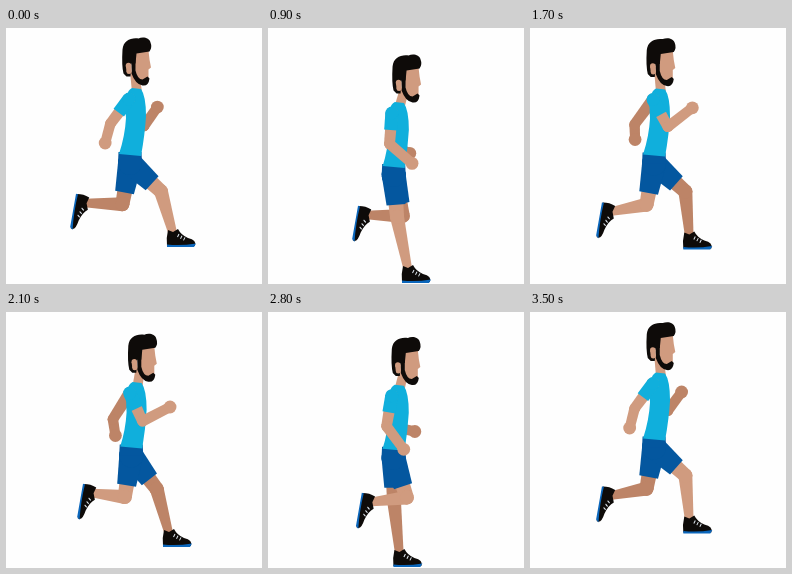
Recreate the animation shown at these times as an HTML page with a canvas. Size 256 by 256 pixels, loop 3.6 s.

```html
<!DOCTYPE html>
<html lang="en">
<head>
<meta charset="utf-8">
<title>Runner</title>
<style>
  html, body { margin: 0; width: 100%; height: 100%; overflow: hidden; background: #fefefe; }
  canvas { display: block; width: 100vw; height: 100vh; }
</style>
</head>
<body>
<canvas id="stage"></canvas>
<script>
const LOOP = 3600, STEP = 100, SIZE = 256, RAD = Math.PI / 180;
const SKIN = '#d09b7f', SHADE = '#bd8467', SHIRT = '#10afdc', SHORTS = '#04579f',
      BLACK = '#0e0b09', SOLE = '#0b66bb', LACE = '#e4ecf4';

// Ankle path of one stride, evenly spaced in time
const ANKLE = [
  [167, 206], [163, 222], [155, 236], [140, 242], [112, 237], [90, 209],
  [79, 175], [86, 181], [92, 186], [99, 187], [113, 199], [137, 216]
];

const HAIR = new Path2D('M1 36Q-1 28 0 12C1 3 8 0 16 1C20-1 27 0 28 5Q30 10 27 14L14 16L13 26L9 26L8 39L4 39Z');
const FACE = new Path2D('M12 13L26 13L27 22L28.5 30L26 32L26 42L13 44Z');
const BEARD = new Path2D('M9 20L13 16L13 33Q15 42 20 42L25 39L27 41Q26 49 20 48Q13 47 9 36Z');
const SHOE = new Path2D('M-5-4Q-7 4-6 12L22 12Q24 6 15 4Q8 1 5-5L0-2Z');
const SOLE_EDGE = new Path2D('M-6 10.5Q8 12 23 9.5L21 13L-6 13Z');

const canvas = document.getElementById('stage');
const ctx = canvas.getContext('2d');

// Closed Catmull-Rom curve; phase runs from 0 to 1
function along(points, phase) {
  const n = points.length, s = phase * n, i = Math.floor(s), u = s - i;
  const [a, b, c, d] = [n - 1, 0, 1, 2].map(k => points[(i + k) % n]);
  return [0, 1].map(k => b[k] + u / 2 * (c[k] - a[k] +
    u * (2 * a[k] - 5 * b[k] + 4 * c[k] - d[k] + u * (3 * (b[k] - c[k]) + d[k] - a[k]))));
}

function smooth(from, to, value) {
  const u = Math.min(1, Math.max(0, (value - from) / (to - from)));
  return u * u * (3 - 2 * u);
}

// Body drop, 0 to 1, twice per stride: falls quickly, rises slowly
function bob(phase) {
  const p = phase * 2 % 1 * Math.PI;
  return (1 - Math.cos(2 * p + 0.8 * Math.sin(p) + 0.4 * Math.sin(2 * p))) / 2;
}

// Point at a distance; the angle is measured forward from straight down
function reach([x, y], length, degrees) {
  return [x + length * Math.sin(degrees * RAD), y + length * Math.cos(degrees * RAD)];
}

function disc([x, y], r, color) {
  ctx.fillStyle = color;
  ctx.beginPath();
  ctx.arc(x, y, r, 0, 2 * Math.PI);
  ctx.fill();
}

// Tapered bar from one point to another, widths at both ends
function bar([x1, y1], [x2, y2], w1, w2, color) {
  const len = Math.hypot(x2 - x1, y2 - y1) || 1;
  const nx = (y1 - y2) / len / 2, ny = (x2 - x1) / len / 2;
  ctx.fillStyle = color;
  ctx.beginPath();
  ctx.moveTo(x1 + nx * w1, y1 + ny * w1);
  ctx.lineTo(x2 + nx * w2, y2 + ny * w2);
  ctx.lineTo(x2 - nx * w2, y2 - ny * w2);
  ctx.lineTo(x1 - nx * w1, y1 - ny * w1);
  ctx.fill();
}

function limb(a, b, w1, w2, color) {
  bar(a, b, w1, w2, color);
  disc(a, w1 / 2, color);
  disc(b, w2 / 2, color);
}

function shoe([x, y], degrees) {
  const down = Math.sin(degrees * RAD);
  ctx.save();
  ctx.translate(x, y);
  ctx.rotate(degrees * RAD);
  ctx.scale(1 + 0.25 * down, 1 - 0.2 * down);
  ctx.fillStyle = BLACK;
  ctx.fill(SHOE);
  ctx.fillStyle = SOLE;
  ctx.fill(SOLE_EDGE);
  for (let i = 0; i < 3; i++) bar([6 + i * 3, i * 1.7], [4.5 + i * 3, 3 + i * 1.7], 1, 1, LACE);
  ctx.restore();
}

function leg(phase, hip, color) {
  const a = phase * 2 * Math.PI;
  const swing = 13.5 + 29 * Math.cos(a) - 4 * Math.sin(a) + 5 * Math.cos(2 * a) - 2 * Math.sin(2 * a);
  const knee = reach(hip, 42, swing), ankle = along(ANKLE, phase);
  const trail = Math.atan2(knee[0] - ankle[0], ankle[1] - knee[1]) / RAD;
  limb(hip, knee, 17, 14, color);
  limb(knee, ankle, 14, 8.5, color);
  shoe(ankle, 100 * smooth(8, 42, trail));
  bar(hip, reach(hip, 30, swing), 24, 19, SHORTS);
  disc(hip, 12, SHORTS);
}

function arm(phase, shoulder, far) {
  const color = far ? SHADE : SKIN;
  const c = Math.cos(phase * 2 * Math.PI);
  const swing = -4 - 33 * c;
  const bend = 49 - 72 * c + 8 * c * c + (far ? 16 : 0);
  const length = (31 - 11 * ((1 + c) / 2) ** 3) * (far ? 0.75 : 1);
  const elbow = reach(shoulder, 31, swing), hand = reach(elbow, length, bend);
  limb(shoulder, elbow, 12, 10.5, color);
  limb(elbow, hand, 10.5, 10, color);
  disc(hand, 6.4, color);
  if (far) return;
  bar(shoulder, reach(shoulder, 17, swing), 13, 13, SHIRT);
  disc(shoulder, 6.5, SHIRT);
}

function torso([wx, wy], [nx, ny]) {
  ctx.fillStyle = SHIRT;
  ctx.beginPath();
  ctx.moveTo(wx - 11, wy + 1);
  ctx.quadraticCurveTo(nx - 12, ny + 48, nx - 11, ny + 30);
  ctx.quadraticCurveTo(nx - 13, ny + 3, nx - 5, ny);
  ctx.lineTo(nx + 4, ny + 1);
  ctx.quadraticCurveTo(nx + 9, ny + 8, nx + 9, ny + 28);
  ctx.quadraticCurveTo(nx + 8, ny + 46, wx + 11, wy + 3);
  ctx.fill();
}

function head([x, y]) {
  ctx.save();
  ctx.translate(x, y);
  for (const [path, color] of [[FACE, SKIN], [BEARD, BLACK], [HAIR, BLACK]]) {
    ctx.fillStyle = color;
    ctx.fill(path);
  }
  limb([6, 28], [6.5, 34], 5.5, 5, SKIN);
  ctx.restore();
}

function draw(phase) {
  const drop = bob(phase), opposite = (phase + 0.5) % 1;
  const waist = [124 + 2 * drop, 125 + 14 * drop];
  const neck = [131 + drop, 60 + 16.5 * drop];
  const skull = [116.5 + 9.5 * drop, 9.5 + 20 * drop];
  const hip = [waist[0], waist[1] + 10];
  const shoulder = [neck[0] - 8, neck[1] + 11];

  ctx.fillStyle = '#fefefe';
  ctx.fillRect(0, 0, SIZE, SIZE);
  arm(opposite, shoulder, true);
  leg(opposite, hip, SHADE);
  leg(phase, hip, SKIN);
  bar([waist[0], waist[1] - 1], hip, 23, 24, SHORTS);
  bar([skull[0] + 12, skull[1] + 34], [neck[0], neck[1] + 4], 9, 10, SKIN);
  torso(waist, neck);
  head(skull);
  arm(phase, shoulder, false);
}

function fit() {
  const ratio = window.devicePixelRatio || 1;
  canvas.width = innerWidth * ratio;
  canvas.height = innerHeight * ratio;
  ctx.setTransform(canvas.width / SIZE, 0, 0, canvas.height / SIZE, 0, 0);
}

const start = performance.now();
function tick() {
  const elapsed = (performance.now() - start) % LOOP;
  draw(Math.floor(elapsed / STEP) * STEP / LOOP);
  requestAnimationFrame(tick);
}

addEventListener('resize', fit);
fit();
tick();
</script>
</body>
</html>
```
